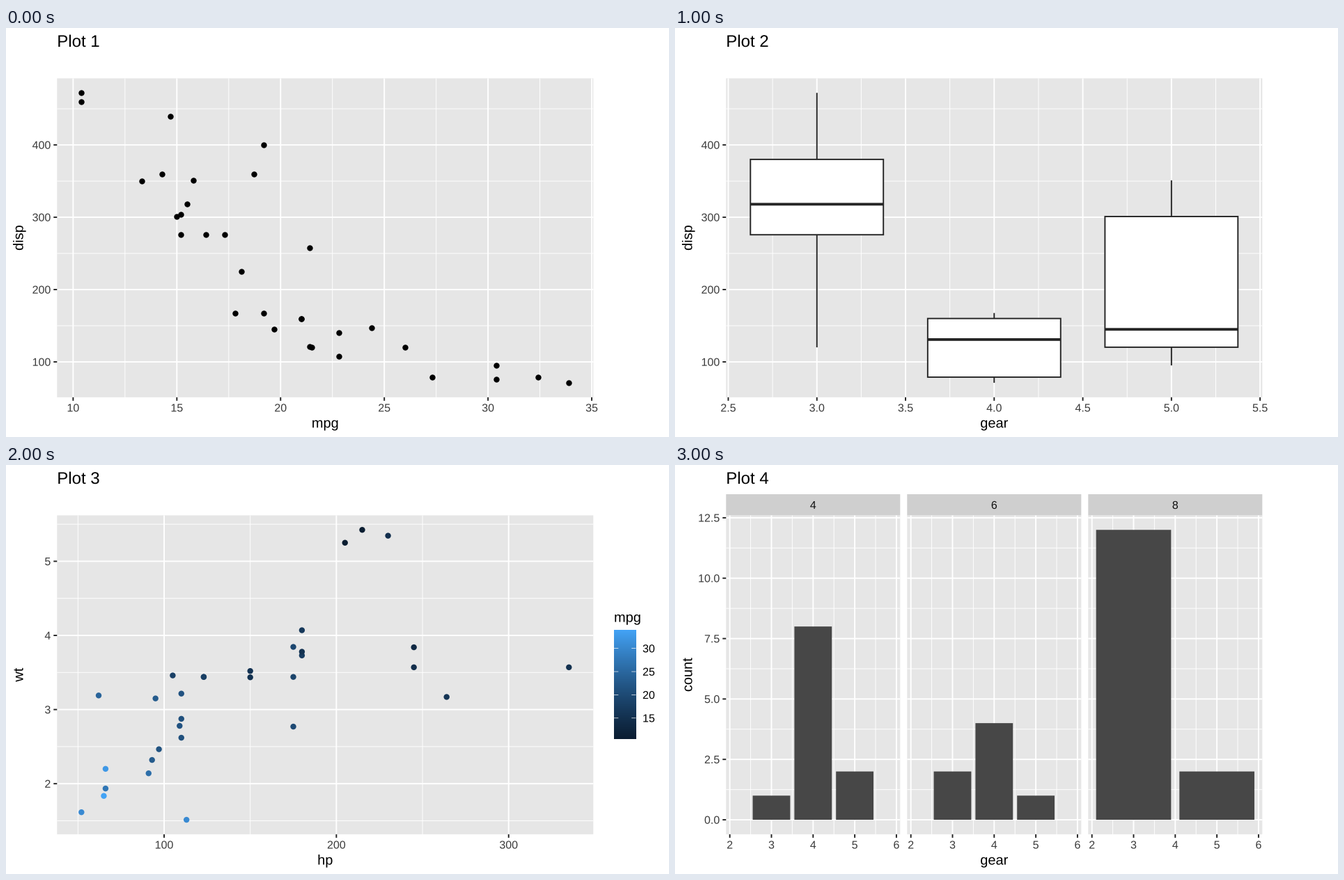
Animation, 952 px wide and 588 px high, one loop 4000 ms. Source, as a matplotlib script:

```python
import matplotlib.pyplot as plt
import numpy as np
from matplotlib.animation import FuncAnimation
from matplotlib.patches import PathPatch, Rectangle
from matplotlib.textpath import TextPath
from matplotlib.transforms import Affine2D

plt.rcParams["path.snap"] = False

W, H, DPI = 952, 588, 64
PT = 72 / DPI  # points per pixel
LEFT, RIGHT, TOP, BOTTOM = 73.3, 843.3, 72.4, 530.9
THIN, LINE = 0.97, 1.94
PANEL, STRIP, BAR, INK, LABEL = "#e6e6e6", "#cfcfcf", "#474747", "#252525", "#3c3c3c"

mpg = np.array([21, 21, 22.8, 21.4, 18.7, 18.1, 14.3, 24.4, 22.8, 19.2, 17.8,
                16.4, 17.3, 15.2, 10.4, 10.4, 14.7, 32.4, 30.4, 33.9, 21.5,
                15.5, 15.2, 13.3, 19.2, 27.3, 26, 30.4, 15.8, 19.7, 15, 21.4])
disp = np.array([160, 160, 108, 258, 360, 225, 360, 146.7, 140.8, 167.6, 167.6,
                 275.8, 275.8, 275.8, 472, 460, 440, 78.7, 75.7, 71.1, 120.1,
                 318, 304, 350, 400, 79, 120.3, 95.1, 351, 145, 301, 121])
hp = np.array([110, 110, 93, 110, 175, 105, 245, 62, 95, 123, 123,
               180, 180, 180, 205, 215, 230, 66, 52, 65, 97,
               150, 150, 245, 175, 66, 91, 113, 264, 175, 335, 109])
wt = np.array([2.62, 2.875, 2.32, 3.215, 3.44, 3.46, 3.57, 3.19, 3.15, 3.44, 3.44,
               4.07, 3.73, 3.78, 5.25, 5.424, 5.345, 2.2, 1.615, 1.835, 2.465,
               3.52, 3.435, 3.84, 3.845, 1.935, 2.14, 1.513, 3.17, 2.77, 3.57, 2.78])
gear = np.repeat([4, 3, 4, 3, 4, 3, 4, 5, 4], [3, 4, 4, 6, 3, 5, 1, 5, 1])
cyl = np.array([6, 6, 4, 6, 8, 6, 8, 4, 4, 6, 6, 8, 8, 8, 8, 8,
                8, 4, 4, 4, 4, 8, 8, 8, 8, 4, 4, 4, 8, 6, 8, 4])

fig = plt.figure(figsize=(W / DPI, H / DPI), dpi=DPI, facecolor="white")
ax = fig.add_axes([0, 0, 1, 1])


def glyphs(s, size):
    return TextPath((0, 0), s, size=size, prop={"family": "Liberation Sans"})


def advance(s, size):
    return glyphs(s + "l", size).get_extents().x1 - glyphs("l", size).get_extents().x1


def text(x, y, s, size, color="black", align=0.0, angle=0):
    """Put s on baseline y; align 0, 0.5 or 1 is left, centre or right."""
    move = (Affine2D().translate(-align * advance(s, size), 0).scale(1, -1)
            .rotate_deg(-angle).translate(x, y))
    ax.add_patch(PathPatch(glyphs(s, size).transformed(move), fc=color, lw=0, zorder=5))


def rect(x0, y0, x1, y1, color, edge="none", lw=0.0, z=1):
    ax.add_patch(Rectangle((x0, y0), x1 - x0, y1 - y0, fc=color, ec=edge,
                           lw=lw * PT, zorder=z))


def vlines(x, y0, y1, color, lw, z=2):
    ax.vlines(x, y0, y1, color=color, lw=lw * PT, zorder=z)


def hlines(y, x0, x1, color, lw, z=2):
    ax.hlines(y, x0, x1, color=color, lw=lw * PT, zorder=z)


def scale(lo, hi, start, end):
    """Map data to pixels with 5 % of room on both sides."""
    pad = 0.05 * (hi - lo)
    return lambda v: start + (np.asarray(v) - lo + pad) / (hi - lo + 2 * pad) * (end - start)


def panel(sx, sy, xs, ys, minor_x, minor_y, left=LEFT, right=RIGHT):
    rect(left, TOP, right, BOTTOM, PANEL)
    vlines(sx(minor_x), TOP, BOTTOM, "white", THIN)
    hlines(sy(minor_y), left, right, "white", THIN)
    vlines(sx(xs), TOP, BOTTOM, "white", LINE)
    hlines(sy(ys), left, right, "white", LINE)


def x_axis(sx, values, fmt="{:.0f}"):
    vlines(sx(values), BOTTOM, BOTTOM + 5, INK, LINE)
    for v in values:
        text(sx(v), 551.5, fmt.format(v), 16, LABEL, 0.5)


def y_axis(sy, values, fmt="{:.0f}"):
    hlines(sy(values), LEFT - 5, LEFT, INK, LINE)
    for v in values:
        text(64.3, sy(v) + 5.7, fmt.format(v), 16, LABEL, 1)


def titles(title, xlabel, ylabel):
    text(LEFT, 27, title, 24)
    text((LEFT + RIGHT) / 2, 574.5, xlabel, 20, align=0.5)
    text(24.5, (TOP + BOTTOM) / 2, ylabel, 20, align=0.5, angle=90)


def points(x, y, color="black"):
    ax.scatter(x, y, s=(8.4 * PT) ** 2, c=color, lw=0, zorder=4)


def blues(v):
    """Dark to light blue over the mpg range, blended in Lab space."""
    to_xyz = np.array([[0.4124, 0.3576, 0.1805], [0.2126, 0.7152, 0.0722],
                       [0.0193, 0.1192, 0.9505]])
    white = to_xyz.sum(axis=1)
    ends = np.array([[19, 43, 67], [86, 177, 247]]) / 255
    linear = np.where(ends > 0.04045, ((ends + 0.055) / 1.055) ** 2.4, ends / 12.92)
    dark, light = np.cbrt(linear @ to_xyz.T / white)
    t = ((np.asarray(v) - mpg.min()) / np.ptp(mpg))[..., None]
    linear = ((dark + t * (light - dark)) ** 3 * white) @ np.linalg.inv(to_xyz).T
    linear = np.clip(linear, 0, 1)
    srgb = np.where(linear > 0.0031308, 1.055 * linear ** (1 / 2.4) - 0.055, 12.92 * linear)
    return np.clip(srgb, 0, 1) ** 1.23  # darker display gamma


DISP_TICKS, DISP_MINOR = [100, 200, 300, 400], [150, 250, 350, 450]
disp_y = scale(disp.min(), disp.max(), BOTTOM, TOP)


def scatter_plot():
    sx = scale(mpg.min(), mpg.max(), LEFT, RIGHT)
    xs = np.arange(10, 36, 5)
    panel(sx, disp_y, xs, DISP_TICKS, xs[:-1] + 2.5, DISP_MINOR)
    points(sx(mpg), disp_y(disp))
    x_axis(sx, xs)
    y_axis(disp_y, DISP_TICKS)
    titles("Plot 1", "mpg", "disp")


def box_plot():
    sx = scale(2.625, 5.375, LEFT, RIGHT)
    xs = np.arange(2.5, 5.6, 0.5)
    panel(sx, disp_y, xs, DISP_TICKS, xs[:-1] + 0.25, DISP_MINOR)
    for g in (3, 4, 5):
        low, q1, mid, q3, high = disp_y(np.percentile(disp[gear == g], [0, 25, 50, 75, 100]))
        x0, x1 = sx(g - 0.375), sx(g + 0.375)
        vlines([sx(g)] * 2, [low, q3], [q1, high], INK, LINE, 3)
        rect(x0, q3, x1, q1, "white", INK, LINE, 3.5)
        hlines(mid, x0, x1, INK, 2 * LINE, 4)
    x_axis(sx, xs, "{:.1f}")
    y_axis(disp_y, DISP_TICKS)
    titles("Plot 2", "gear", "disp")


def color_legend():
    x0, x1, y0, y1 = 873, 904.5, 237.6, 394.5
    text(x0, 225.6, "mpg", 20)
    shades = blues(np.linspace(mpg.max(), mpg.min(), 157))[:, None]
    ax.imshow(shades, extent=(x0, x1, y1, y0), aspect="auto", zorder=1)
    for v in (15, 20, 25, 30):
        y = y1 - (v - mpg.min()) / np.ptp(mpg) * (y1 - y0)
        hlines([y, y], [x0, x1 - 6.3], [x0 + 6.3, x1], "white", 0.7)
        text(914, y + 5.7, str(v), 16)


def color_plot():
    sx = scale(hp.min(), hp.max(), LEFT, RIGHT)
    sy = scale(wt.min(), wt.max(), BOTTOM, TOP)
    xs, ys = [100, 200, 300], [2, 3, 4, 5]
    panel(sx, sy, xs, ys, [50, 150, 250], np.arange(1.5, 6))
    points(sx(hp), sy(wt), blues(mpg))
    x_axis(sx, xs)
    y_axis(sy, ys)
    titles("Plot 3", "hp", "wt")
    color_legend()


def facet_plot():
    sy = scale(0, 12, BOTTOM, TOP)
    xs, ys = np.arange(2, 7), np.arange(0, 13, 2.5)
    for i, c in enumerate((4, 6, 8)):
        left = LEFT + 260 * i
        right = left + 250
        sx = scale(2.1, 5.9, left, right)
        panel(sx, sy, xs, ys, xs[:-1] + 0.5, ys[:-1] + 1.25, left, right)
        rect(left, 42, right, TOP, STRIP)
        text((left + right) / 2, 63, str(c), 16, "#111111", 0.5)
        gears, counts = np.unique(gear[cyl == c], return_counts=True)
        half = 0.45 * np.diff(gears).min()
        for g, n in zip(gears, counts):
            rect(sx(g - half), sy(n), sx(g + half), sy(0), BAR, z=3)
        x_axis(sx, xs)
    y_axis(sy, ys, "{:.1f}")
    titles("Plot 4", "gear", "count")


PLOTS = [scatter_plot, box_plot, color_plot, facet_plot]


def draw(i):
    ax.clear()
    ax.set(xlim=(0, W), ylim=(H, 0))
    ax.axis("off")
    PLOTS[i % len(PLOTS)]()
    return []


anim = FuncAnimation(fig, draw, frames=len(PLOTS), interval=1000,
                     init_func=lambda: [], repeat=True, repeat_delay=0)
plt.show()
```
